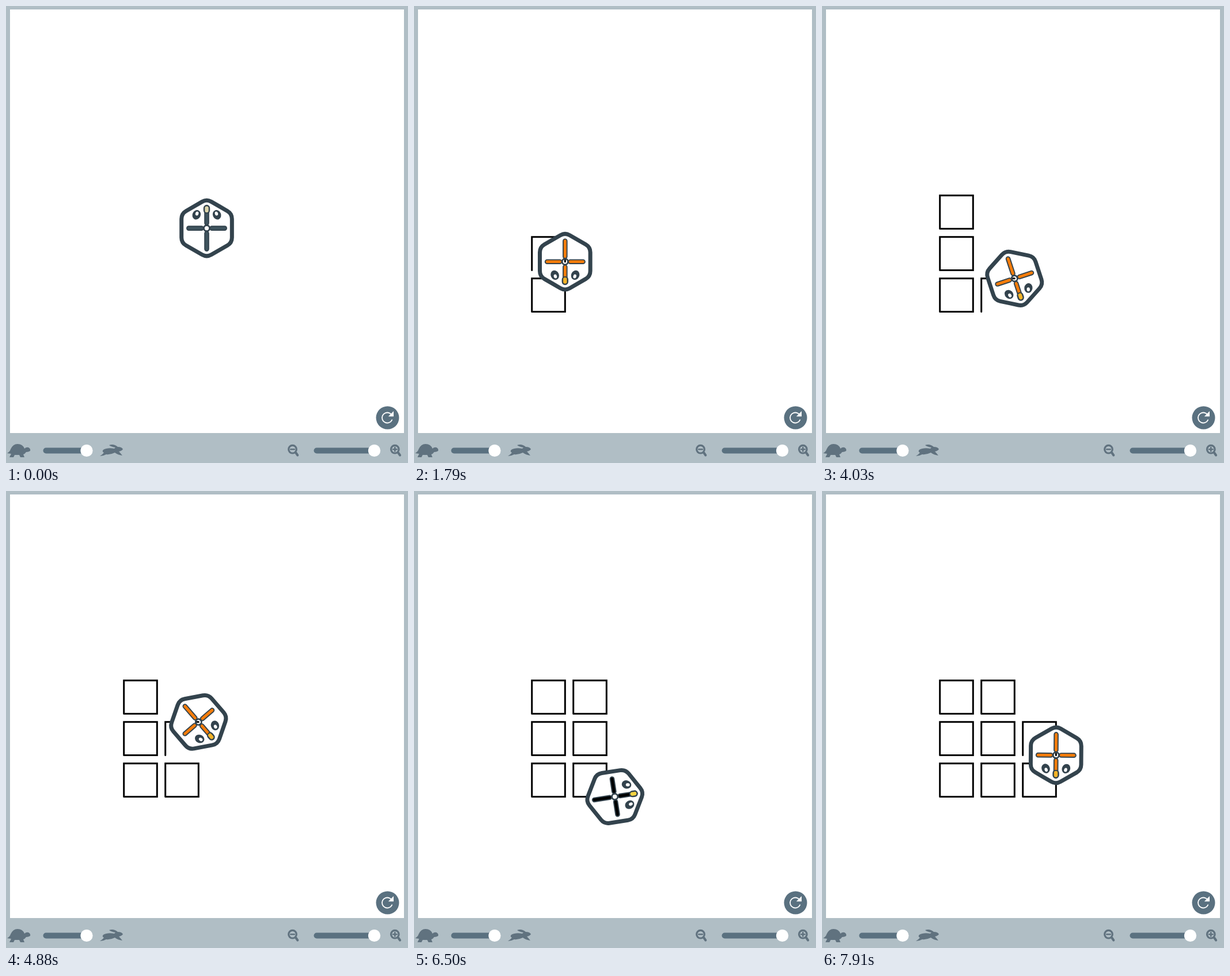
Recreate the animation shown at these times as an HTML page with a canvas. Size 698 by 793 pixels, loop 7.99 s.

```html
<!DOCTYPE html>
<html lang="en">
<head>
<meta charset="utf-8">
<title>Drawing robot</title>
<style>
  html, body { margin: 0; width: 100%; height: 100%; overflow: hidden; background: #b0bec5; }
  canvas { display: block; }
</style>
</head>
<body>
<canvas id="stage" width="698" height="793"></canvas>
<script>
const ctx = document.getElementById('stage').getContext('2d');
const TAU = Math.PI * 2, RAD = Math.PI / 180;
const LOOP = 7990, FIRST = 230, TICK = 77.58;   // screen refreshes about 13 times a second
const SIDE = 57.6, PITCH = 72, DRIVE = 72, TURN = 82;
const BAR = '#b0bec5', SLATE = '#5a7180', ICON = '#60727f', DARK = '#33434d';

// ---- route: keys of time, place, heading and pen ----
const keys = [];
let now = { t: 0, x: 348.5, y: 385.6, h: 0, pen: false };
function key(t, change) {
  now = { ...now, ...change, t };
  keys.push(now);
}
function square(t) {
  key(t, { pen: true });
  const { x, y } = now;
  const corners = [[x, y - SIDE], [x + SIDE, y - SIDE], [x + SIDE, y], [x, y]];
  corners.forEach(([cx, cy], i) => {
    key(t += DRIVE, { x: cx, y: cy });
    key(t += TURN, { h: 90 * (i + 1) });
  });
  key(t, { h: 0 });
}
function hop(t0, t1) {
  key(t0, { pen: false });
  key(t1, { y: now.y - PITCH });
}
function travel(t0, t1, col, h) {
  key(t0, { pen: false });
  key(t0 + (t1 - t0) * 0.62, { x: 204.7 + PITCH * col, y: 530.4, h });
  key(t1, { h: 0 });
}

key(0, {});
travel(190, 378, 0, -135);
square(600);  hop(1245, 1335);
square(1420); hop(2072, 2160);
square(2327); hop(3060, 3150);
travel(3235, 3640, 1, 162);
square(3740); hop(4520, 4609);
square(4614); hop(5262, 5348);
square(5376); hop(6080, 6175);
travel(6212, 6585, 2, 162);
square(6755); hop(7447, 7529);
square(7530);

const mix = (a, b, k) => a + (b - a) * k;
function poseAt(t) {
  let i = keys.length - 1;
  while (i > 0 && keys[i].t > t) i--;
  const a = keys[i], b = keys[i + 1] || a;
  const k = b.t > a.t ? Math.min(1, (t - a.t) / (b.t - a.t)) : 0;
  return { i, pen: a.pen, x: mix(a.x, b.x, k), y: mix(a.y, b.y, k), h: mix(a.h, b.h, k) };
}

// ---- drawing helpers ----
function line(color, width, ...p) {
  ctx.strokeStyle = color;
  ctx.lineWidth = width;
  ctx.beginPath();
  ctx.moveTo(p[0], p[1]);
  for (let i = 2; i < p.length; i += 2) ctx.lineTo(p[i], p[i + 1]);
  ctx.stroke();
}
function oval(color, x, y, rx, ry = rx, turn = 0) {
  ctx.fillStyle = color;
  ctx.beginPath();
  ctx.ellipse(x, y, rx, ry, turn * RAD, 0, TAU);
  ctx.fill();
}
function ring(color, width, x, y, r, from = 0, to = 360) {
  ctx.strokeStyle = color;
  ctx.lineWidth = width;
  ctx.beginPath();
  ctx.arc(x, y, r, from * RAD, to * RAD);
  ctx.stroke();
}
function shape(color, d) {
  ctx.fillStyle = color;
  ctx.fill(new Path2D(d));
}

function trace(pose) {
  ctx.strokeStyle = '#000';
  ctx.lineWidth = 3;
  ctx.lineJoin = 'miter';
  ctx.beginPath();
  for (let i = 0; i <= pose.i; i++) {
    if (!keys[i].pen) continue;
    if (!keys[i - 1].pen) ctx.moveTo(keys[i].x, keys[i].y);
    const end = i < pose.i ? keys[i + 1] : pose;
    const last = i < pose.i ? keys[i] : keys[pose.i];
    if (end.x !== last.x || end.y !== last.y) ctx.lineTo(end.x, end.y);
  }
  ctx.stroke();
  ctx.lineJoin = 'round';
}

function hexagon(radius, round) {
  const at = n => [radius * Math.sin(n * 60 * RAD), -radius * Math.cos(n * 60 * RAD)];
  const [x0, y0] = at(0), [x1, y1] = at(1);
  ctx.moveTo((x0 + x1) / 2, (y0 + y1) / 2);
  for (let n = 1; n <= 6; n++) ctx.arcTo(...at(n), ...at(n + 1), round);
  ctx.closePath();
}

function robot(pose, t) {
  const off = t < 190;
  const arm = off ? '#3f545e' : pose.pen ? '#f57c0a' : '#000';
  const lamp = off ? '#dcd5ab' : pose.pen ? '#f6b326' : '#f4d341';
  ctx.save();
  ctx.translate(pose.x, pose.y);
  ctx.rotate(pose.h * RAD);

  // body, with the pen hole left open
  ctx.beginPath();
  hexagon(50.6, 16);
  ctx.moveTo(4, 0);
  ctx.arc(0, 0, 4, 0, TAU);
  ctx.fillStyle = '#fff';
  ctx.fill('evenodd');
  ctx.beginPath();
  hexagon(50.6, 16);
  ctx.strokeStyle = DARK;
  ctx.lineWidth = 7;
  ctx.stroke();

  const arms = [[0, -36], [0, 36], [-31.2, 0], [31.2, 0]];
  for (const [color, width] of [[DARK, 8.6], [arm, 4.8]])
    for (const [x, y] of arms) {
      const r = Math.hypot(x, y), start = 9 / r;
      line(color, width, x * start, y * start, x, y);
    }
  line(DARK, 11.4, 0, -34.8, 0, -31);
  line(lamp, 6.4, 0, -34.8, 0, -30.5);
  ring(DARK, 2.8, 0, 0, 5.1);

  for (const s of [-1, 1]) {
    oval(DARK, s * 17.7, -23.3, 7.1, 8.4, -s * 25);
    oval('#fff', s * 16.9, -25.4, 2.7, 3.5, -s * 15);
  }
  ctx.restore();
}

function slider(x0, x1) {
  line(SLATE, 10, x0, 771.5, x1, 771.5);
  oval('#fff', x1, 771.5, 10.6);
}
function magnifier(x, plus) {
  ring(ICON, 3.2, x, 769.2, 6.8);
  line(ICON, 4, x + 6, 775.5, x + 8.8, 779.5);
  line(ICON, 2.6, x - 3.2, 769.2, x + 3.2, 769.2);
  if (plus) line(ICON, 2.6, x, 766, x, 772.4);
}

function panel() {
  ctx.fillStyle = BAR;
  ctx.fillRect(0, 0, 698, 793);
  ctx.fillStyle = '#fff';
  ctx.fillRect(7, 6, 684, 735);
}
function controls() {
  oval(SLATE, 662.5, 714.5, 20);
  ring('#fff', 1.8, 662, 714.5, 9, 25, 318);
  shape('#fff', 'M673 703V712.2H663.8Z');

  // tortoise and hare
  shape(ICON, 'M2 776Q7 773 8 769Q12 760 20 760Q29 760 32 768Q35 765 39 766Q43 768 42 772Q39 774 35 774Q33 777 30 778L32 783H25L23 779H15L13 783H6L9 777Z');
  shape(ICON, 'M163 781Q168 778 170 775Q166 773 169 770Q176 766 188 768L190 766Q183 765 179 762Q187 759 194 765Q201 765 203 769Q201 772 196 773Q199 776 202 780Q194 779 189 775Q181 779 174 778Q169 781 163 781Z');

  slider(69.5, 140);
  slider(539.5, 639.5);
  magnifier(497.5, false);
  magnifier(675.3, true);
}

function draw(ms) {
  const n = Math.floor((ms - FIRST + 13) / TICK);
  const t = n < 0 ? 0 : FIRST + n * TICK;
  const pose = poseAt(t);
  ctx.lineCap = ctx.lineJoin = 'round';
  panel();
  trace(pose);
  robot(pose, t);
  controls();
}

const began = performance.now();
function loop() {
  draw((performance.now() - began) % LOOP);
  requestAnimationFrame(loop);
}
loop();
</script>
</body>
</html>
```
